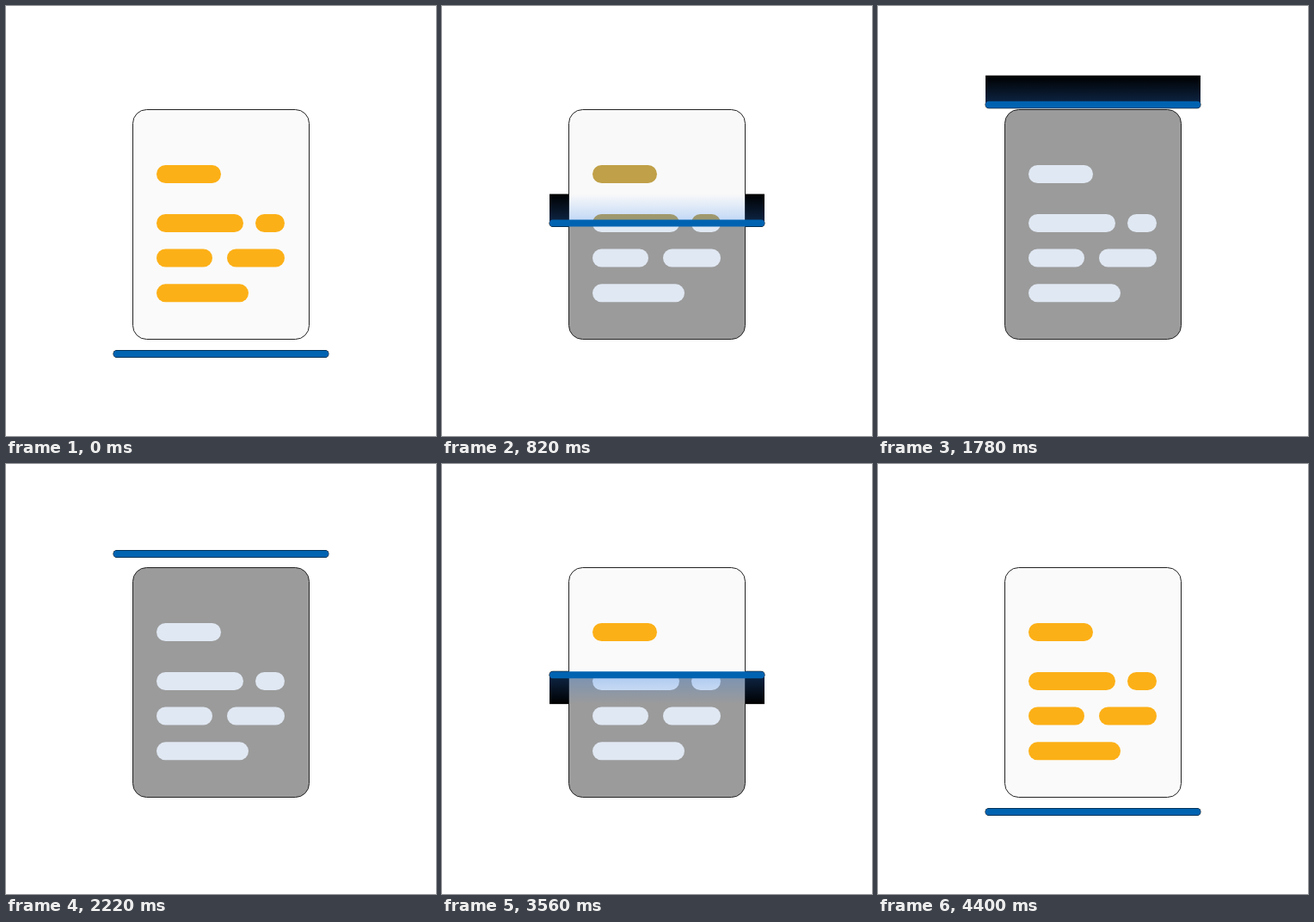
An HTML page with a canvas that plays this animation: 500 by 500 pixels, repeating every 4560 ms.

```html
<!DOCTYPE html>
<html lang="en">
<head>
<meta charset="utf-8">
<title>Document scan</title>
<style>
html, body { margin: 0; width: 100%; height: 100%; overflow: hidden; background: #fff; }
canvas { display: block; width: 500px; height: 500px; }
</style>
</head>
<body>
<canvas id="stage" width="500" height="500"></canvas>
<script>
const ctx = document.getElementById('stage').getContext('2d');
const LOOP = 4560, STEP = 20, TURN = 2200, END = 4400;
const BOTTOM = 404.5, TOP = 104.5, BEAM = 34;
// Text lines of the page: x, y, width
const LINES = [[175, 185, 75], [175, 242, 101], [290, 242, 34],
               [175, 282.5, 65], [257, 282.5, 67], [175, 323.3, 107]];

const clamp = v => Math.min(1, Math.max(0, v));
const bezier = (s, a, b) => 3 * s * (1 - s) ** 2 * a + 3 * s * s * (1 - s) * b + s ** 3;

function ease(x) {
  let lo = 0, hi = 1;
  for (let i = 0; i < 24; i++) {
    const mid = (lo + hi) / 2;
    if (bezier(mid, .35, .45) < x) lo = mid; else hi = mid;
  }
  return bezier(lo, .27, 1);
}

function box(x, y, w, h, r, fill) {
  ctx.beginPath();
  ctx.roundRect(x, y, w, h, r);
  ctx.fillStyle = fill;
  ctx.fill();
}

// The part of the page between two heights
function page(from, to, paper, ink) {
  ctx.save();
  ctx.beginPath();
  ctx.rect(0, from, 500, to - from);
  ctx.clip();
  box(147.5, 120.5, 205, 267, 16, paper);
  for (const [x, y, w] of LINES) box(x, y, w, 21, 10.5, ink);
  ctx.restore();
}

function draw(t) {
  const rising = t < TURN;
  const progress = clamp(rising ? (t - 20) / (TURN - 20) : (END - t) / (END - TURN));
  const y = BOTTOM + (TOP - BOTTOM) * ease(progress);
  const lit = rising ? t > 60 && t < 2150 : t > 2260 && t < 4335;
  const tip = rising ? y - BEAM : y + BEAM;
  const beamTop = Math.min(y, tip);

  ctx.fillStyle = '#fff';
  ctx.fillRect(0, 0, 500, 500);
  if (lit) {
    ctx.fillStyle = '#000';
    ctx.fillRect(125, beamTop, 250, BEAM);
  }
  box(124.5, y - 4.5, 251, 9, 4.5, '#000');

  const fade = rising ? t / 820 : 0;
  const ink = `rgb(${252 - 60 * fade},${176 - 16 * fade},${23 + 49 * fade})`;
  page(0, y, rising && t > 20 ? '#f9f9f9' : '#fafafa', ink);
  page(y, 500, '#9b9b9b', '#e0e8f3');
  ctx.beginPath();
  ctx.roundRect(147.5, 120.5, 205, 267, 16);
  ctx.lineWidth = 1;
  ctx.strokeStyle = '#222';
  ctx.stroke();

  if (lit) {
    const glow = ctx.createLinearGradient(0, tip, 0, y);
    glow.addColorStop(0, 'rgba(47,128,237,0)');
    glow.addColorStop(1, 'rgba(47,128,237,.3)');
    ctx.fillStyle = glow;
    ctx.fillRect(125, beamTop, 250, BEAM);
  }
  box(125, y - 4, 250, 8, 4, '#0063b1');
}

function tick() {
  draw(Math.floor(performance.now() % LOOP / STEP) * STEP);
  requestAnimationFrame(tick);
}
tick();
</script>
</body>
</html>
```
